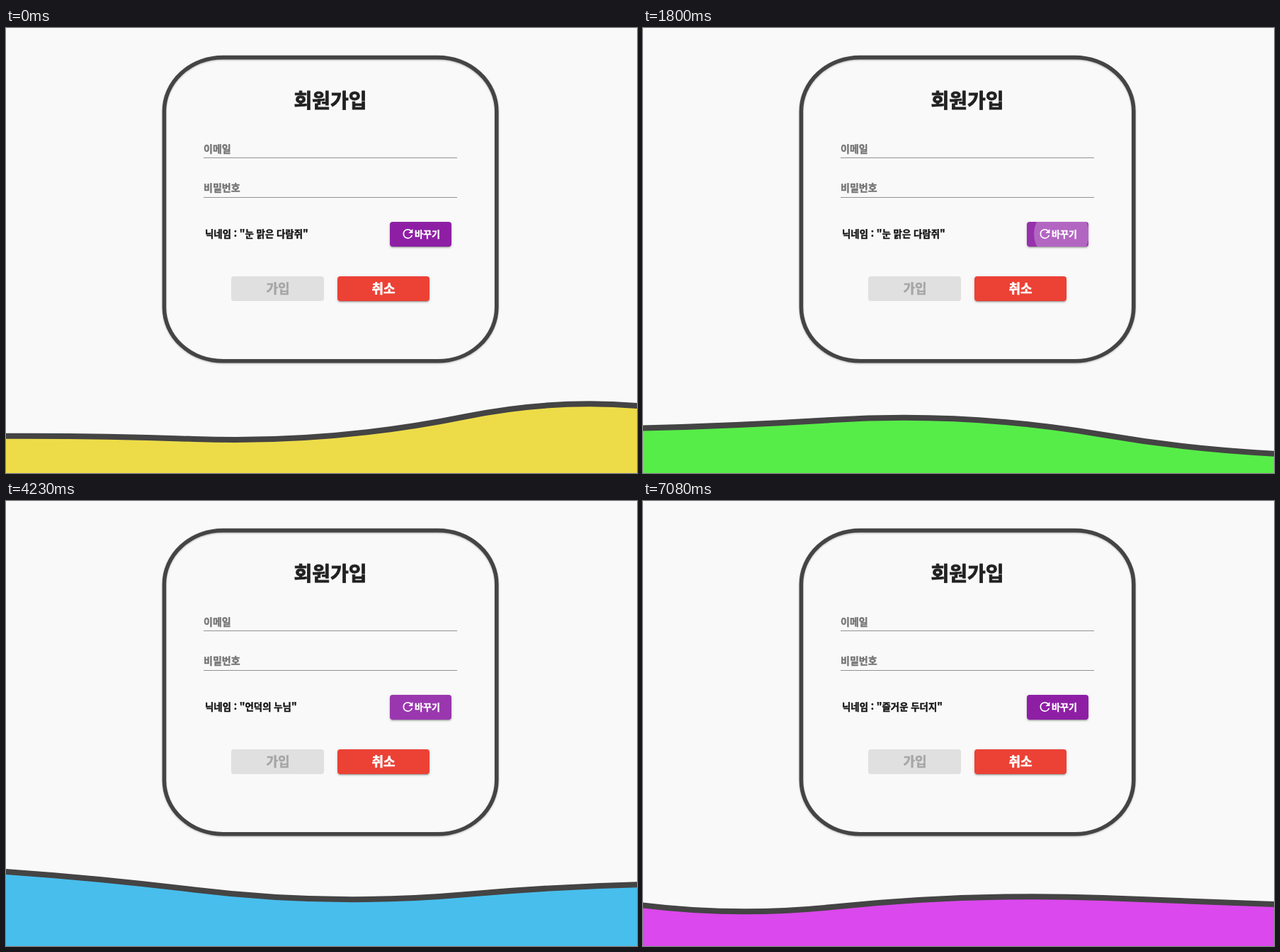
An HTML page for the animation above (7.11 s loop, 891 by 629 pixels).

```html
<!DOCTYPE html>
<html lang="ko">
<meta charset="utf-8">
<title>회원가입</title>
<style>
html, body { margin: 0; width: 100%; height: 100%; overflow: hidden; background: #f9f9f9; }
div, svg { position: absolute; }
svg { left: 0; top: 0; }
.line { left: 279px; width: 358px; height: 1px; background: #929292; }
.btn { height: 35px; border-radius: 4px; overflow: hidden; }
.raised { box-shadow: 0 3px 1px -2px #0003, 0 2px 2px #0002, 0 1px 4px #0002; }
.pressed { box-shadow: 0 3px 4px -1px #0003, 0 4px 6px #0002; }
#glow { inset: 0; background: #fff; }
.ripple { border-radius: 50%; background: #fff; }
.card { filter: drop-shadow(0 1px 1px #0004); }
text {
  font-family: "Noto Sans CJK KR", "Noto Sans CJK", sans-serif; font-weight: 900;
  fill: currentColor; stroke: currentColor; stroke-width: .03em;
}
.mid { text-anchor: middle; }
</style>
<div class="line" style="top:183px"></div>
<div class="line" style="top:239px"></div>
<div class="btn raised" id="change" style="left:542px;top:274px;width:87px;background:#8e1fa5"><div id="glow"></div></div>
<div class="btn" style="left:318px;top:351px;width:131px;background:#e0e0e0"></div>
<div class="btn raised" style="left:468px;top:351px;width:130px;background:#ec4135"></div>
<svg width="891" height="629">
  <rect class="card" x="223.4" y="41.6" width="469.4" height="429.2" rx="83" ry="76" fill="none" stroke="#444" stroke-width="5.6"/>
  <path id="wave" stroke="#444" stroke-width="8"/>
  <g font-size="14" color="#757575">
    <text x="279" y="176">이메일</text>
    <text x="279" y="231">비밀번호</text>
    <text id="nick" x="281" y="296" font-size="13.4" color="#151515"></text>
  </g>
  <text class="mid" x="458" y="112.5" font-size="28" color="#212121">회원가입</text>
  <text x="577" y="296" font-size="13" color="#fff">바꾸기</text>
  <g class="mid" font-size="18">
    <text x="384" y="375" color="#a6a6a6">가입</text>
    <text x="533" y="375" color="#fff">취소</text>
  </g>
  <path transform="translate(557 280.5) scale(.87)" fill="#fff"
    d="M17.65 6.35A7.96 7.96 0 0 0 12 4a8 8 0 1 0 7.73 10h-2.08A6 6 0 1 1 12 6c1.66 0 3.14.69 4.22 1.78L13 11h7V4z"/>
</svg>
<script>
const LOOP = 7110, REST = 554, GAP = 384, LEFT = -310;
const $ = id => document.getElementById(id);
const clamp = v => Math.max(0, Math.min(1, v));
const swing = u => (1 - Math.cos(Math.PI * clamp(u))) / 2;

// turning points: time, then how far each wave handle is from rest
const poses = [
  [0, 29, 20, 34, -44, 50],
  [1050, -36, -9, 42, -34, 10],
  [1800, 15, 12, -12, 54, 45],
  [2940, -15, 5, -19, -4, -19],
  [4230, -46, -28, 19, -15, -10],
  [5310, -18, 43, -30, -46, -20],
  [7080, -46, 40, 0, 14, 29]
];

// each click brings the next name a little later
const clicks = [1560, 3340, 4290, 5150], REPLY = 320;
const names = ['눈 맑은 다람쥐', '목요일의 도토리', '언덕의 누님', '꿈에 빠진 참새', '즐거운 두더지'];

const ripples = clicks.map(() => {
  const el = document.createElement('div');
  el.className = 'ripple';
  return $('change').appendChild(el);
});

function drawWave(t) {
  const next = Math.max(1, poses.findIndex(p => p[0] > t));
  const [t0, ...from] = poses.at(t < poses.at(-1)[0] ? next - 1 : -2);
  const [t1, ...to] = poses.at(t < poses.at(-1)[0] ? next : -1);
  const y = from.map((a, i) => REST + a + (to[i] - a) * swing((t - t0) / (t1 - t0)));
  const mid = i => `${LEFT + GAP * (i + .5)} ${(y[i] + y[i + 1]) / 2}`;
  let d = 'M' + mid(0);
  for (let i = 1; i < 4; i++) d += `Q${LEFT + GAP * i} ${y[i]} ${mid(i)}`;
  $('wave').setAttribute('d', d + `V700H${LEFT + GAP / 2}Z`);
  $('wave').setAttribute('fill', `hsl(${54 + t * .0338} 82% 60.5%)`);
}

function drawButton(t) {
  $('glow').style.opacity = .11 * Math.sin(Math.PI * t / LOOP);
  clicks.forEach((start, i) => {
    const age = t - start, r = 52 * (1 - (1 - clamp(age / 550)) ** 2.4);
    Object.assign(ripples[i].style, {
      left: 49 - r + 'px', top: 17 - r + 'px', width: 2 * r + 'px', height: 2 * r + 'px',
      opacity: .26 * (1 - swing((age - 250) / 550))
    });
  });
  const pressed = clicks.some(c => t >= c && t < c + 200);
  $('change').className = 'btn ' + (pressed ? 'pressed' : 'raised');
}

function draw() {
  const t = performance.now() % LOOP;
  drawWave(t);
  drawButton(t);
  $('nick').textContent = `닉네임 : "${names[clicks.filter(c => t >= c + REPLY).length]}"`;
  requestAnimationFrame(draw);
}
draw();
</script>
</html>
```
